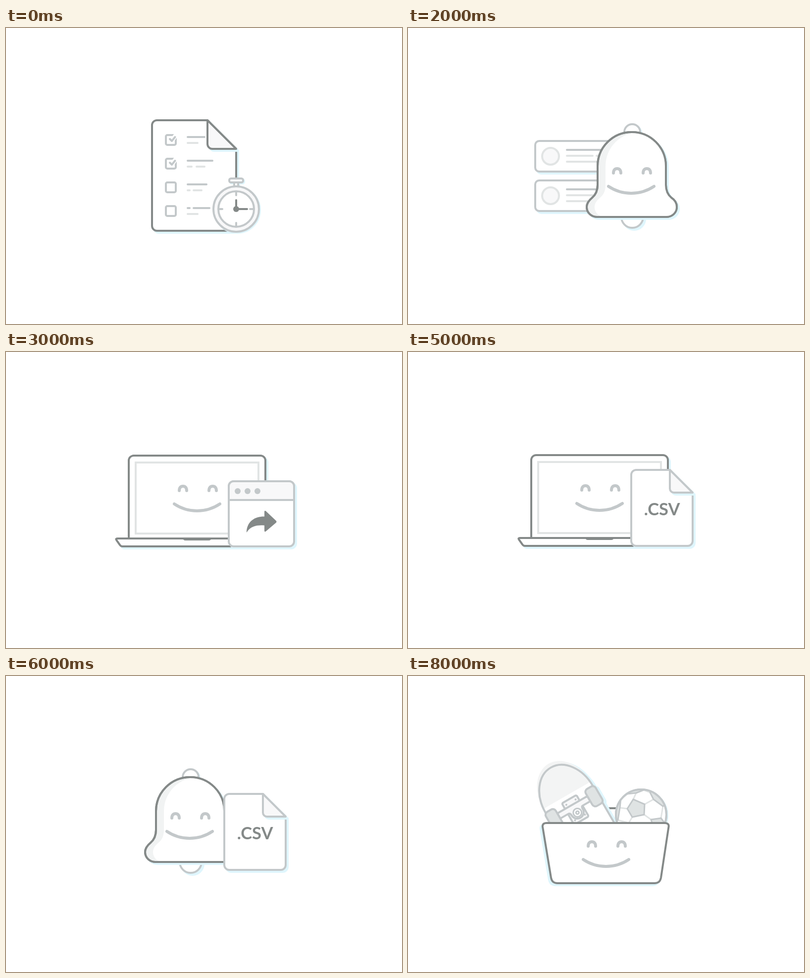
An HTML page for the animation above (9000 ms loop, 800 by 600 pixels).

```html
<!DOCTYPE html>
<html lang="en">
<head>
<meta charset="utf-8">
<title>Icon slideshow</title>
<style>
  html, body { margin: 0; width: 100%; height: 100%; overflow: hidden; background: #fff; }
  svg { display: block; width: 800px; height: 600px; }
  svg * { stroke-linecap: round; stroke-linejoin: round; }

  .dark, .mid, .light { fill: none; stroke-width: 4px; }
  .dark { stroke: #848988; }
  .mid { stroke: #c3c8ca; }
  .light { stroke: #e1e4e4; }
  .thin { stroke-width: 3px; }
  .thick { stroke-width: 6px; }
  .white { fill: #fff; }
  .pale { fill: #f8f8f9; }
  .patch { fill: #dfe3e3; }
  .solid-dark { fill: #848988; }
  .solid-mid { fill: #c3c8ca; }
  text { font-family: Lato, sans-serif; font-weight: 700; fill: #848988; }

  .shade { filter: drop-shadow(4px 4px 0 #dff6fd); }
  .shade-s { filter: drop-shadow(2px 2px 0 #dff6fd); }
  .shade-r { filter: drop-shadow(6px 2px 0 #dff6fd); }
  .shade-l { filter: drop-shadow(-4px 4px 0 #dff6fd); }

  .slide { visibility: hidden; animation: show 9s step-end infinite; animation-delay: calc(var(--i) * 1s); }
  @keyframes show {
    0% { visibility: visible; }
    11.11111% { visibility: hidden; }
  }
</style>
</head>
<body>
<svg viewBox="0 0 800 600" aria-hidden="true">
  <defs>
    <g id="face">
      <path class="mid thick" d="M-36-27C-36-33-33-36-28.500-36S-21-33-21-27M24-27C24-33 27-36 31.500-36S39-33 39-27"/>
      <path class="mid thick" d="M-46 0A82.600 82.600 0 0 0 46 0"/>
    </g>

    <g id="box"><rect class="mid" x="323" y="217" width="20" height="20" rx="3"/></g>
    <g id="tick">
      <use href="#box"/>
      <path d="M336 227L345 215" stroke="#fff" stroke-width="9"/>
      <path class="mid" d="M331 225l4 4 6.500-8"/>
    </g>

    <g id="list">
      <path class="dark white shade" d="M305 187H407L465 245V401a10 10 0 0 1-10 10H305a10 10 0 0 1-10-10V197a10 10 0 0 1 10-10z"/>
      <use href="#tick"/>
      <use href="#tick" y="48"/>
      <use href="#box" y="96"/>
      <use href="#box" y="144"/>
      <path class="mid" d="M367 221H401M367 269H417M367 317H405M367 365H371M379 365H411"/>
      <path class="light" d="M367 233H387M367 281H375M385 281H401M367 329H371M379 329H395M367 377H387"/>
      <path class="dark pale shade" d="M407 187V235a10 10 0 0 0 10 10H465z"/>
    </g>

    <g id="watch" class="shade-s">
      <path class="mid white" d="M461 321V313H469V321"/>
      <rect class="mid pale" x="451" y="305" width="28" height="8" rx="3.500"/>
      <circle class="mid pale" cx="465" cy="367" r="46"/>
      <circle class="mid white" cx="465" cy="367" r="36"/>
      <path class="mid" d="M465 333V339M465 395V401M431 367H437M493 367H499"/>
      <path class="dark" d="M465 349V367H487"/>
      <circle class="solid-dark" cx="465" cy="367" r="6"/>
    </g>

    <g id="card">
      <rect class="mid white shade" x="257" y="229" width="200" height="62" rx="8"/>
      <circle class="light pale" cx="288" cy="260" r="17"/>
      <path class="mid" d="M321 247H415"/>
      <path class="light" d="M321 271H415"/>
    </g>
    <g id="cards">
      <use href="#card"/>
      <path class="light" d="M321 259H373M381 259H415"/>
      <use href="#card" y="80"/>
      <path class="light" d="M321 339H415"/>
    </g>

    <path id="bellShape" d="M383 280A69 69 0 0 1 521 280V318C521 332 526 339 532 344C540 349 543 355 543 363C543 374 534 383 522 383H382C370 383 361 374 361 363C361 355 366 349 372 344C378 339 383 332 383 318z"/>
    <clipPath id="bellClip"><use href="#bellShape"/></clipPath>
    <g id="bell">
      <circle class="mid white shade-s" cx="453" cy="211" r="16"/>
      <circle class="mid white shade" cx="453" cy="383" r="22"/>
      <use href="#bellShape" class="dark shade" style="fill:#f1f3f3"/>
      <g clip-path="url(#bellClip)"><use href="#bellShape" x="16" fill="#fff"/></g>
      <use href="#bellShape" class="dark"/>
      <use href="#face" x="451" y="321"/>
    </g>

    <g id="laptop">
      <path class="dark white shade" d="M248 378V220a10 10 0 0 1 10-10H514a10 10 0 0 1 10 10V378z"/>
      <rect class="light" x="262" y="224" width="248" height="144" style="stroke-linejoin:miter"/>
      <path class="dark white shade" transform="translate(386 0)" d="M-161 378H-28C-26 378-27 380-24 380H24C27 380 26 378 28 378H161Q165 378 163.500 381L158 391Q156.500 394 153 394H-151Q-154 394-156 391L-163 381Q-165 378-161 378z"/>
      <use href="#face" x="386" y="308"/>
    </g>

    <g id="window">
      <rect class="mid white shade" x="450" y="262" width="132" height="132" rx="10"/>
      <path class="mid pale" d="M450 300V272a10 10 0 0 1 10-10H572a10 10 0 0 1 10 10V300z"/>
      <g class="solid-mid">
        <circle cx="468" cy="282" r="6"/><circle cx="488" cy="282" r="6"/><circle cx="508" cy="282" r="6"/>
      </g>
      <path class="solid-dark" d="M486 366C486 346 500 333 522 333.500V324Q522 320.500 525 322.500L545.500 342Q547.500 344 545.500 346L525 363.500Q522 365.500 522 362V351.500C506 350 493 354 486 366z"/>
    </g>

    <g id="csv">
      <path class="mid white shade" d="M461 239H529L575 285V383a10 10 0 0 1-10 10H461a10 10 0 0 1-10-10V249a10 10 0 0 1 10-10z"/>
      <path class="mid pale shade" d="M529 239V277a8 8 0 0 0 8 8H575z"/>
      <text x="513" y="331" font-size="34.500" text-anchor="middle">.CSV</text>
    </g>

    <g id="mail">
      <rect class="mid white shade" x="188" y="310" width="140" height="84" rx="8"/>
      <path class="mid" d="M190 313L247 361Q258 369 269 361L326 313M190 391L234 352"/>
    </g>

    <clipPath id="globeClip"><circle cx="544" cy="324" r="70"/></clipPath>
    <g id="globe">
      <circle class="mid white shade" cx="544" cy="324" r="70"/>
      <g class="light" clip-path="url(#globeClip)">
        <path d="M544 254V394M474 324H614M484 283Q544 301 604 283M484 363Q544 345 604 363"/>
        <ellipse cx="544" cy="324" rx="37" ry="72"/>
      </g>
      <circle class="mid" cx="544" cy="324" r="70"/>
      <rect class="dark white shade-s" x="497" y="303.500" width="96" height="43" rx="6"/>
      <text x="510.500" y="331.500" font-size="18" letter-spacing="4.700">WWW</text>
    </g>

    <g id="wheel"><rect class="mid patch" x="192" y="379" width="23" height="40" rx="7"/></g>
    <g id="board" class="shade-r">
      <g transform="rotate(-30)">
        <path class="white" d="M102 379A55 74 0 0 1 212 379V470H102z"/>
        <path fill="#f3f4f4" d="M102 370A55 74 0 0 1 212 370z" />
        <path class="mid" d="M102 470V379A55 74 0 0 1 212 379V470"/>
        <rect class="mid pale" x="140" y="379" width="34" height="50" rx="3"/>
        <path class="mid pale" d="M122 392H192V404H174Q171 404 171 410A13 13 0 0 1 145 410Q145 404 140 404H122z"/>
        <circle class="mid thin white" cx="158" cy="411" r="8.500"/>
        <circle class="mid thin" cx="158" cy="411" r="3"/>
        <g class="solid-mid">
          <circle cx="146.500" cy="386" r="2"/><circle cx="168" cy="386" r="2"/>
          <circle cx="146" cy="422" r="2"/><circle cx="169" cy="422" r="2"/>
        </g>
        <use href="#wheel"/>
        <use href="#wheel" x="-93"/>
      </g>
    </g>

    <clipPath id="ballClip"><circle cx="471" cy="281" r="51"/></clipPath>
    <g id="ball">
      <circle class="mid white shade-s" cx="471" cy="281" r="51"/>
      <g clip-path="url(#ballClip)">
        <path class="light thin" d="M455 250L461 237M478 260L496 250M477 281L491 291M453 286L446 298M443 269L428 267M515 264L511 288M443 239L430 250M476 231L489 236M446 298L424 292"/>
        <path class="mid patch thin" d="M455 250L478 260L477 281L453 286L443 269zM443 239L461 237L476 231L470 222H445zM489 236L496 250L515 264L525 255L500 225zM491 291L511 288L520 300L495 304zM430 248L428 267L424 292L412 290V250z"/>
      </g>
      <circle class="mid" cx="471" cy="281" r="51"/>
    </g>

    <g id="basket">
      <path class="dark" d="M300 268H500"/>
      <use href="#board"/>
      <use href="#ball"/>
      <path class="dark white shade-l" d="M280 298H518Q528 298 526.500 306L511 409Q509 420 498 420H302Q291 420 289 409L272 306Q271 298 280 298z"/>
      <use href="#face" x="400" y="372"/>
    </g>
  </defs>

  <g class="slide" style="--i:0"><use href="#list"/><use href="#watch"/></g>
  <g class="slide" style="--i:1"><use href="#cards" x="14"/><use href="#watch" x="17" y="-8"/></g>
  <g class="slide" style="--i:2"><use href="#cards"/><use href="#bell"/></g>
  <g class="slide" style="--i:3"><use href="#laptop"/><use href="#window"/></g>
  <g class="slide" style="--i:4"><use href="#list" x="-30" y="16"/><use href="#window" x="-50" y="30"/></g>
  <g class="slide" style="--i:5"><use href="#laptop" x="1" y="-1"/><use href="#csv"/></g>
  <g class="slide" style="--i:6"><use href="#bell" x="-80" y="-6"/><use href="#csv" x="-10"/></g>
  <g class="slide" style="--i:7"><use href="#mail"/><use href="#laptop" x="8"/><use href="#globe"/></g>
  <g class="slide" style="--i:8"><use href="#basket"/></g>
</svg>
</body>
</html>
```
